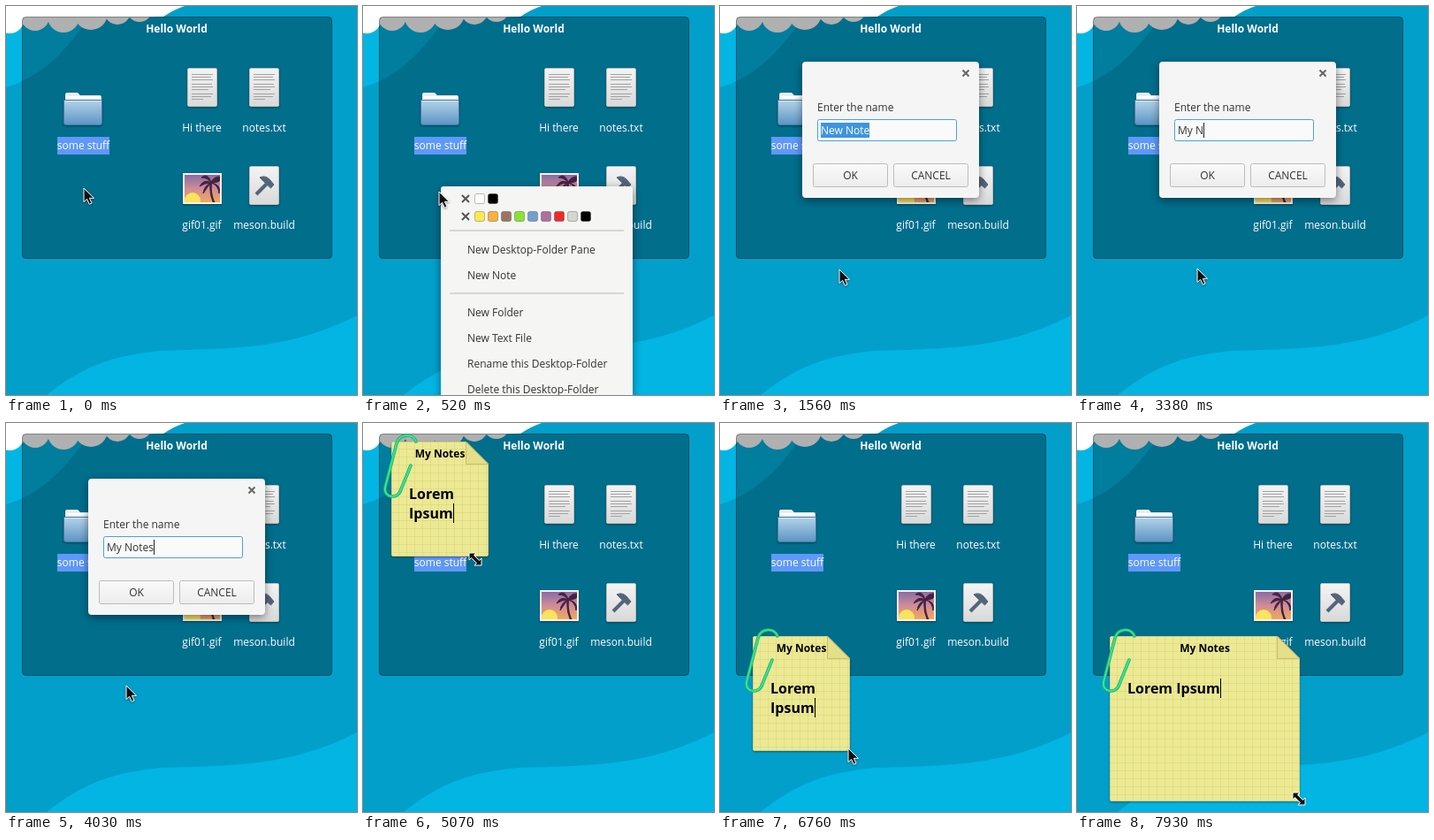
An HTML page for the animation above (8000 ms loop, 397 by 440 pixels).

```html
<!DOCTYPE html>
<html lang="en">
<head>
<meta charset="utf-8">
<title>Desktop notes</title>
<style>
html, body { margin: 0; width: 100%; height: 100%; overflow: hidden; background: #029fca; }
svg { display: block; width: 397px; height: 440px; }
text { font: 12px "Open Sans", "Noto Sans", sans-serif; white-space: pre; fill: #333; }
.b { font-weight: 700; }
.m { text-anchor: middle; }
.w text, text.w { fill: #fff; }
.k text { fill: #000; }
.big { font-size: 16px; font-weight: 700; }
.sh { filter: drop-shadow(0 3px 5px rgba(0,0,0,.45)); }
.lo { filter: drop-shadow(0 1px 1px rgba(0,0,0,.4)); }
</style>
</head>
<body>
<svg viewBox="0 0 397 440" xmlns="http://www.w3.org/2000/svg">
  <defs>
    <linearGradient id="paper" x2="0" y2="1"><stop stop-color="#f4f4f4"/><stop offset="1" stop-color="#d9d9d9"/></linearGradient>
    <linearGradient id="blue" x2="0" y2="1"><stop stop-color="#b4d3e8"/><stop offset="1" stop-color="#5c95c3"/></linearGradient>
    <linearGradient id="dusk" x2="0" y2="1"><stop stop-color="#8a6ca6"/><stop offset=".5" stop-color="#cf8c97"/><stop offset="1" stop-color="#f0a95a"/></linearGradient>
    <linearGradient id="btn" x2="0" y2="1"><stop stop-color="#fafafa"/><stop offset="1" stop-color="#ececec"/></linearGradient>
    <pattern id="grid" width="9" height="9" patternUnits="userSpaceOnUse"><path d="M8.5 0V9M0 8.5H9" stroke="#a89a30" stroke-opacity=".14"/></pattern>
    <clipPath id="photo"><rect x="202" y="191" width="40" height="31"/></clipPath>
    <g id="page">
      <rect class="lo" x=".5" y=".5" width="33" height="43" rx="1.5" fill="url(#paper)" stroke="#bdbdbd"/>
    </g>
    <g id="doc">
      <use href="#page"/>
      <path d="M5 7.5H29M5 10.5H27M5 13.5H29M5 18.5H28M5 21.5H29M5 24.5H24M5 29.5H29M5 32.5H27M5 35.5H18" stroke="#a2a2a2"/>
    </g>
  </defs>

  <rect width="397" height="440" fill="#029fca"/>
  <path d="M0 92Q50 78 90 18L88 0H0Z" fill="#02b5e3"/>
  <path d="M46 440C90 405 125 395 175 390C250 387 320 390 397 350V440Z" fill="#02b5e3"/>
  <g id="cloud" fill="#fff"></g>
  <rect x="18.5" y="12.5" width="350" height="273" rx="4" fill="#000" fill-opacity=".31" stroke="#000" stroke-opacity=".4"/>

  <g class="w">
    <text class="b m" x="193" y="30">Hello World</text>
    <rect x="58" y="148" width="59" height="20" fill="#5f98f8"/>
    <text class="m" x="87.5" y="162">some stuff</text>
    <text class="m" x="221.5" y="142">Hi there</text>
    <text class="m" x="292" y="142">notes.txt</text>
    <text class="m" x="221.5" y="252">gif01.gif</text>
    <text class="m" x="292" y="252">meson.build</text>
  </g>

  <g class="lo">
    <path d="M67 133V100Q67 98 69 98H81L84 101H106Q108 101 108 103V133Z" fill="#e9eef2"/>
    <path d="M68 103H107" stroke="#fff" stroke-width="2"/>
    <path d="M65.5 106.5H108.5V132Q108.500 134.500 106 134.500H68Q65.500 134.500 65.500 132Z" fill="url(#blue)" stroke="#447aa6"/>
    <path d="M66.500 107.500H107.500" stroke="#d5e7f3"/>
  </g>
  <use href="#doc" x="205" y="70"/>
  <use href="#doc" x="275" y="70"/>
  <use href="#page" x="275" y="181"/>
  <g transform="translate(275 181)" fill="none" stroke="#53657b">
    <path d="M8 32L20 20" stroke-width="4"/>
    <path d="M12 13Q18 10 23 15L28 21L24.500 25L16 17Z" fill="#53657b"/>
  </g>
  <rect class="lo" x="200" y="189" width="44" height="35" fill="#f4f1ec"/>
  <g clip-path="url(#photo)">
    <rect x="202" y="191" width="40" height="31" fill="url(#dusk)"/>
    <circle cx="211" cy="220" r="9" fill="#fbe35c"/>
    <path d="M232 199Q230 212 236 224" fill="none" stroke="#46223f" stroke-width="2.500"/>
    <path d="M232 200Q224 195 219 204Q225 200 232 200Q224 203 223 212Q228 204 232 200Q240 202 241 212Q244 202 232 200Q244 200 243 193Q236 192 232 199Q228 188 221 194Q228 194 232 200" fill="#46223f" stroke="#46223f"/>
  </g>

  <g id="note" class="k">
    <path id="clipBack" d="M28 1Q30 5 27 11" fill="none" stroke="#25bd74" stroke-width="3"/>
    <path id="sheet" class="lo" fill="#ece994" stroke="#d3cd80"/>
    <path id="lines" fill="url(#grid)"/>
    <path id="fold" d="M-25 0V25H0Z" fill="#e4df88" stroke="#c6bf70" stroke-linejoin="round"/>
    <g fill="none" stroke-linecap="round">
      <path d="M22 27L11 54C8 66 -9 64 -7 52L6 2C9 -9 24 -10 28 0" stroke="#20ad68" stroke-width="3.600"/>
      <path d="M22 27L11 54C8 66 -9 64 -7 52L6 2C9 -9 24 -10 28 0" stroke="#37e493" stroke-width="2"/>
    </g>
    <text id="head" class="b m" y="18">My Notes</text>
    <text id="line1" class="big" x="20" y="65"></text>
    <text id="line2" class="big" x="20" y="87">Ipsum</text>
    <rect id="caret" width="1" height="22"/>
  </g>

  <g id="menu">
    <rect class="sh" x="88" y="204" width="217" height="260" rx="3" fill="#f5f5f4"/>
    <rect id="hover" x="88" y="290" width="217" height="29" fill="#d9e4ee"/>
    <path d="M98 254H295M98 325H295" stroke="#d6d6d6" stroke-width="2"/>
    <path d="M112 214l8 8m0-8l-8 8M112 234l8 8m0-8l-8 8" stroke="#555" stroke-width="2"/>
    <g id="swatches"></g>
    <g id="items"></g>
  </g>

  <g id="dialog">
    <rect class="sh" x="93" y="63" width="200" height="154" rx="4" fill="#f5f5f5"/>
    <path d="M274.500 72.500l7 7m0-7l-7 7" stroke="#666" stroke-width="2"/>
    <text x="110" y="119">Enter the name</text>
    <rect x="110.500" y="128.500" width="157" height="24" rx="2" fill="#fafafa" stroke="#4a9fe4"/>
    <rect id="mark" x="114" y="132" width="55" height="17" fill="#3e95dc"/>
    <text id="entry" x="114" y="145"></text>
    <rect id="bar" y="132" width="1" height="17" fill="#222"/>
    <g fill="url(#btn)" stroke="#bcbcbc">
      <rect x="105.500" y="178.500" width="84" height="26" rx="2"/>
      <rect x="196.500" y="178.500" width="84" height="26" rx="2"/>
    </g>
    <text class="m" x="147.500" y="196">OK</text>
    <text class="m" x="238.500" y="196">CANCEL</text>
  </g>

  <g id="mouse" stroke="#fff" fill="#111">
    <path id="arrow" class="lo" d="M0 0V15.500L3.600 12.400L6.300 18.300L9 17L6.400 11.300H11.500Z"/>
    <path id="size" d="M-7 -7H1L-1.500 -4.500L4.500 1.500L7 -1V7H-1L1.500 4.500L-4.500 -1.500L-7 1Z"/>
    <path id="beam" d="M-3.500 -8.500H3.500V-6H1.200V6H3.500V8.500H-3.500V6H-1.200V-6H-3.500Z"/>
  </g>
</svg>
<script>
const LOOP = 8000;
const $ = id => document.getElementById(id);
const set = (id, attrs) => { for (const k in attrs) $(id).setAttribute(k, attrs[k]); };
const fade = (id, v) => { $(id).style.display = v ? "" : "none"; $(id).style.opacity = v; };
const label = (id, s) => { if ($(id).textContent !== s) $(id).textContent = s; };
// last row whose time has been reached
const at = (rows, t) => rows.reduce((a, r) => r[0] <= t ? r : a);

$("cloud").innerHTML = '<path d="M0 0H202Q192 3 178 12L120 14H0Z"/>' +
  [[4, 14, 17], [33, 12, 16], [65, 12, 18], [96, 8, 19], [126, 6, 15], [151, 4, 14], [170, 2, 10]]
    .map(([x, y, r]) => `<circle cx="${x}" cy="${y}" r="${r}"/>`).join("");

const swatch = (y, list) => list.map((c, i) =>
  `<rect x="${126.5 + 15 * i}" y="${y}" width="11" height="11" rx="2" fill="${c}" stroke="#000" stroke-opacity=".25"/>`).join("");
$("swatches").innerHTML = swatch(212.5, ["#fff", "#000"]) +
  swatch(232.5, ["#fce94f", "#fcaf3e", "#9c7562", "#8ae234", "#729fcf", "#ad6fa0", "#ef2929", "#d3d7cf", "#000"]);
$("items").innerHTML = [["New Desktop-Folder Pane", 280], ["New Note", 309], ["New Folder", 351], ["New Text File", 380],
  ["Rename this Desktop-Folder", 409], ["Delete this Desktop-Folder", 438]]
  .map(([s, y]) => `<text x="118" y="${y}">${s}</text>`).join("");

const menu = [[0, 0], [390, 1], [1170, .5], [1300, 0]];
const dialog = [[0, 0], [1170, .4], [1300, .8], [1430, 1], [4160, .4], [4290, 0]];
const typed = [[0, "New Note"], [2210, "M"], [2470, "My"], [2730, "My "], [3380, "My N"],
  [3640, "My No"], [3770, "My Not"], [3900, "My Note"], [4030, "My Notes"]];
const notePos = [[0, 32, 21], [5720, 33, 80], [5850, 35, 165], [5980, 36, 240], [6240, 37, 241]];
const noteSize = [[0, 110, 130], [7150, 115, 137], [7280, 128, 150], [7410, 143, 163],
  [7540, 159, 174], [7670, 175, 184], [7800, 190, 189], [7930, 215, 187]];
const mouse = [
  [0, 88, 206, "arrow"], [390, 87, 208, "arrow"], [520, 86, 210, "arrow"], [650, 92, 228, "arrow"],
  [780, 108, 260, "arrow"], [910, 126, 288, "arrow"], [1040, 135, 298, "arrow"], [1690, 136, 297, "arrow"],
  [4810, 139, 262, "arrow"], [4940, 138, 198, "arrow"], [5070, 127, 154, "size"], [5200, 117, 112, "beam"],
  [5330, 103, 68, "beam"], [5460, 88, 40, "arrow"], [5590, 81, 33, "arrow"],
  [5720, 82, 92, "arrow"], [5850, 84, 177, "arrow"], [5980, 85, 252, "arrow"], [6240, 86, 253, "arrow"],
  [6370, 98, 282, "beam"], [6500, 122, 327, "beam"], [6630, 139, 358, "arrow"], [6760, 145, 368, "arrow"],
  [7020, 146, 368, "size"]];

function drawNote(t) {
  const [, x, y] = at(notePos, t), [, w, h] = at(noteSize, t);
  const wide = w >= 148;
  const d = `M2 .5H${w - 25}L${w - .5} 25V${h - 2}Q${w - .5} ${h - .5} ${w - 2} ${h - .5}H2Q.5 ${h - .5} .5 ${h - 2}V2Q.5 .5 2 .5Z`;
  set("note", { transform: `translate(${x} ${y})` });
  set("sheet", { d });
  set("lines", { d });
  set("fold", { transform: `translate(${w - .5} .5)` });
  set("head", { x: w / 2 });
  label("line1", wide ? "Lorem Ipsum" : "Lorem");
  fade("line2", wide ? 0 : 1);
  fade("caret", t >= 4550 ? 1 : 0);
  set("caret", { x: wide ? 125 : 70, y: wide ? 48 : 70 });
  return [x + w, y + h];
}

function drawEntry(t) {
  const fresh = t < 2210;
  label("entry", at(typed, t)[1]);
  $("entry").style.fill = fresh ? "#fff" : "#333";
  fade("mark", fresh ? 1 : 0);
  fade("bar", fresh ? 0 : 1);
  set("bar", { x: Math.round(114 + $("entry").getComputedTextLength()) });
}

function draw(t) {
  const corner = drawNote(t);
  let [, x, y, kind] = at(mouse, t);
  if (t >= 7150) [x, y] = [corner[0] - 1, corner[1] - 3];
  set("mouse", { transform: `translate(${x} ${y})` });
  for (const id of ["arrow", "size", "beam"]) fade(id, id === kind ? 1 : 0);
  fade("menu", at(menu, t)[1]);
  fade("hover", y >= 288 ? 1 : 0);
  fade("dialog", at(dialog, t)[1]);
  fade("note", t >= 4290 ? 1 : 0);
  if (t >= 1170 && t < 4290) drawEntry(t);
}

const start = performance.now();
function tick() {
  draw((performance.now() - start) % LOOP);
  requestAnimationFrame(tick);
}
tick();
</script>
</body>
</html>
```
